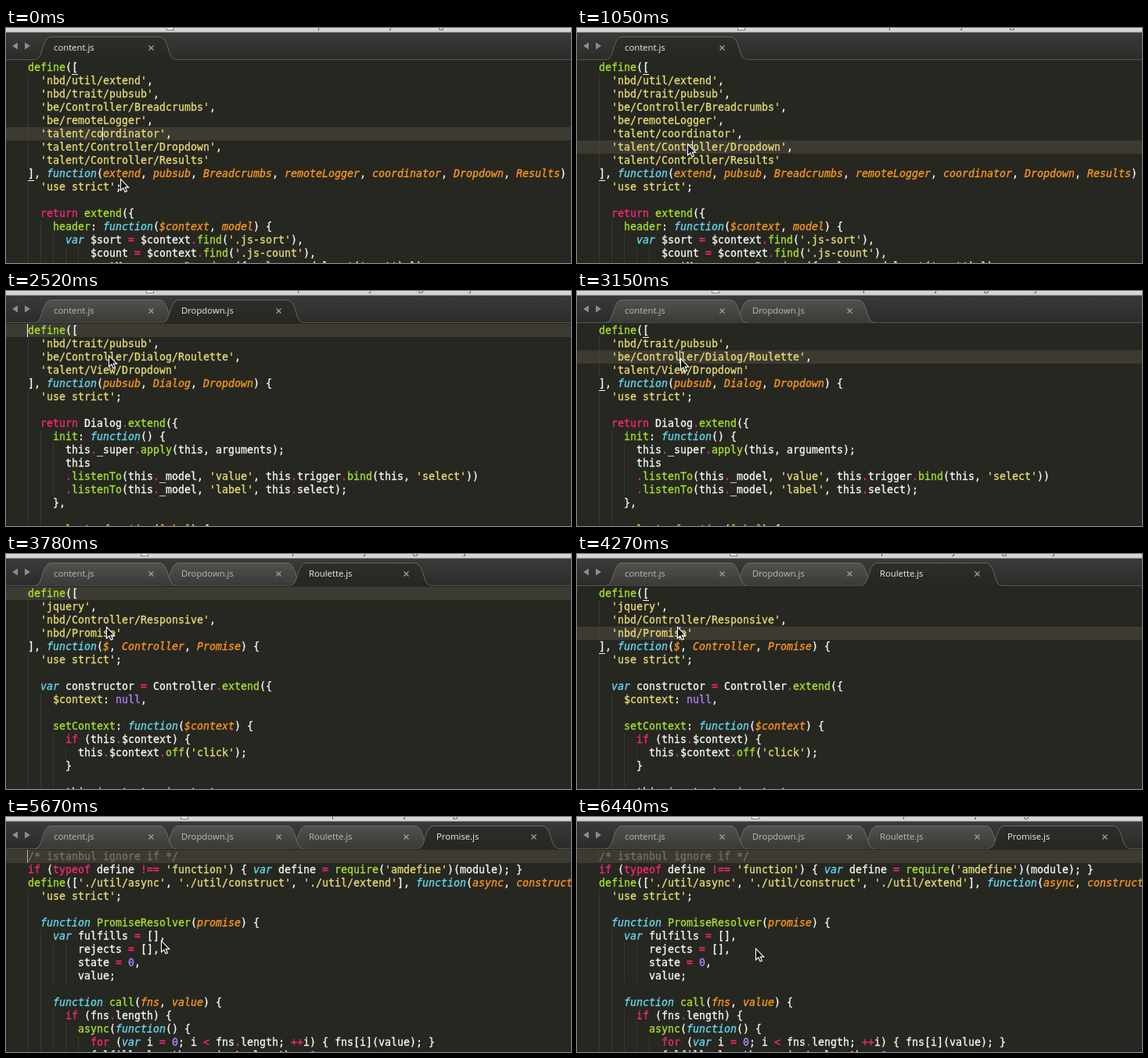
An HTML page with a canvas that plays this animation: 722x301 px, repeating every 6510 ms.

```html
<!DOCTYPE html>
<html lang="en">
<head>
<meta charset="utf-8">
<title>Code editor</title>
<style>
html, body { margin: 0; width: 722px; height: 301px; overflow: hidden; background: #262721; }
canvas { display: block; }
</style>
</head>
<body>
<canvas id="stage" width="722" height="301"></canvas>
<script>
const ctx = document.getElementById('stage').getContext('2d');
const WIDTH = 722, HEIGHT = 301, LOOP = 6510, STEP = 70;
const LEFT = 28, TOP = 42, CELL = 8, LINE = 17;
const MONO = '13.29px "DejaVu Sans Mono", monospace';
const UI = '11.3px "Open Sans", sans-serif';
const INK = {
  back: '#262721', line: '#3d3a32', plain: '#f8f8f2', comment: '#75715e', string: '#e6db74',
  storage: '#66d9ef', keyword: '#f92672', value: '#ae81ff', call: '#a6e22e', param: '#fd971f'
};

const files = {
  content: `define([
  'nbd/util/extend',
  'nbd/trait/pubsub',
  'be/Controller/Breadcrumbs',
  'be/remoteLogger',
  'talent/coordinator',
  'talent/Controller/Dropdown',
  'talent/Controller/Results'
], function(extend, pubsub, Breadcrumbs, remoteLogger, coordinator, Dropdown, Results) {
  'use strict';

  return extend({
    header: function($context, model) {
      var $sort = $context.find('.js-sort'),
          $count = $context.find('.js-count'),
          sortMenu = new Dropdown({ value: model.get('sort') })`,
  dropdown: `define([
  'nbd/trait/pubsub',
  'be/Controller/Dialog/Roulette',
  'talent/View/Dropdown'
], function(pubsub, Dialog, Dropdown) {
  'use strict';

  return Dialog.extend({
    init: function() {
      this._super.apply(this, arguments);
      this
      .listenTo(this._model, 'value', this.trigger.bind(this, 'select'))
      .listenTo(this._model, 'label', this.select);
    },

    select: function(label) {`,
  roulette: `define([
  'jquery',
  'nbd/Controller/Responsive',
  'nbd/Promise'
], function($, Controller, Promise) {
  'use strict';

  var constructor = Controller.extend({
    $context: null,

    setContext: function($context) {
      if (this.$context) {
        this.$context.off('click');
      }

      this.$context = $context;`,
  promise: `/* istanbul ignore if */
if (typeof define !== 'function') { var define = require('amdefine')(module); }
define(['./util/async', './util/construct', './util/extend'], function(async, construct, extend) {
  'use strict';

  function PromiseResolver(promise) {
    var fulfills = [],
        rejects = [],
        state = 0,
        value;

    function call(fns, value) {
      if (fns.length) {
        async(function() {
          for (var i = 0; i < fns.length; ++i) { fns[i](value); }
          fulfills.length = rejects.length = 0;`
};
for (const name in files) files[name] = files[name].split('\n');

const tabs = [
  { name: 'content.js', at: -STEP },
  { name: 'Dropdown.js', at: 1960 },
  { name: 'Roulette.js', at: 3570 },
  { name: 'Promise.js', at: 5040 }
];

// Each entry overrides the fields it names; closer is the row of the matching bracket.
const changes = [
  { at: 0, file: 'content', row: 5, col: 12, closer: 8, active: 0, icon: 210, blink: -350 },
  { at: 770, row: 6, col: 15, blink: null },
  { at: 1610, active: -1, icon: 184 },
  { at: 1680, file: 'dropdown', row: 0, col: 0, closer: 0, blink: 1400 },
  { at: 1960, active: 1 },
  { at: 2590, row: 2, col: 13, closer: 4, blink: null, icon: 204 },
  { at: 3150, active: -1, icon: 177 },
  { at: 3290, file: 'roulette', row: 0, col: 0, closer: 0, blink: 3150 },
  { at: 3570, active: 2 },
  { at: 3990, row: 3, col: 13, closer: 4, blink: null, icon: 200 },
  { at: 4620, active: -1, icon: 184 },
  { at: 4760, file: 'promise', row: 0, col: 0, closer: 0, blink: 4760 },
  { at: 5040, active: 3 },
  { at: 5600, icon: 228 }
];

const pointerPath = [
  [0, 146, 193], [70, 146, 193], [630, 142, 150], [770, 142, 150], [1050, 141, 148],
  [1890, 141, 148], [2520, 131, 82], [2940, 131, 82], [3010, 131, 84], [3080, 131, 84],
  [3150, 132, 86], [3220, 132, 86], [3780, 128, 93], [4550, 128, 93], [4830, 190, 155],
  [5530, 190, 155], [6020, 228, 168], [LOOP, 228, 168]
];

const syntax = new RegExp([
  /(?<comment>\/\*.*?\*\/)/, /(?<string>'[^']*')/, /(?<storage>\b(?:function|var)\b)/,
  /(?<param>(?<=function ?\w*\([^)]*)[$\w]+)/, /(?<keyword>\b(?:if|return|typeof|new|for)\b|[=!<+.]+)/,
  /(?<value>\b(?:null|\d+)\b)/, /(?<call>[$\w]+(?=\(|: function))/, /(?<label>[$\w]+(?=:))/,
  /(?<plain>[$\w]+|[^\s\w])/
].map(r => r.source).join('|'), 'g');

function rect(x, y, w, h, fill) {
  ctx.fillStyle = fill;
  ctx.fillRect(x, y, w, h);
}

function shade(y0, y1, from, to) {
  const g = ctx.createLinearGradient(0, y0, 0, y1);
  g.addColorStop(0, from);
  g.addColorStop(1, to);
  return g;
}

function polygon(points, fill) {
  ctx.beginPath();
  points.forEach(([x, y]) => ctx.lineTo(x, y));
  ctx.closePath();
  ctx.fillStyle = fill;
  ctx.fill();
}

function pointerAt(t) {
  const i = pointerPath.findIndex(p => p[0] > t);
  const [t0, x0, y0] = pointerPath[i - 1], [t1, x1, y1] = pointerPath[i];
  const u = (t - t0) / (t1 - t0), k = u * u * (3 - 2 * u);
  return [Math.round(x0 + (x1 - x0) * k), Math.round(y0 + (y1 - y0) * k)];
}

function caretAlpha(t, reset) {
  if (reset === null) return 1;
  const d = (t - reset) % 1050;
  if (d < 490) return 1;
  if (d < 770) return Math.max(0, 1 - (d - 420) / 280) ** 2;
  return Math.min(1, (d - 770) / 210);
}

function drawLine(text, row) {
  const y = TOP + row * LINE + 13;
  for (const m of text.matchAll(syntax)) {
    const kind = Object.keys(m.groups).find(k => m.groups[k] !== undefined);
    const italic = kind === 'storage' || kind === 'param';
    const x = LEFT + m.index * CELL;
    ctx.font = (italic ? 'italic ' : '') + MONO;
    ctx.fillStyle = ctx.strokeStyle = INK[kind === 'label' ? 'string' : kind];
    ctx.lineWidth = 0.3;
    ctx.fillText(m[0], x, y);
    ctx.strokeText(m[0], x, y);
  }
}

function drawGuides(lines) {
  const indent = s => s ? s.search(/\S/) : 0;
  lines.forEach((s, row) => {
    const depth = s ? indent(s) : Math.min(indent(lines[row - 1]), indent(lines[row + 1]));
    for (let col = 0; col < depth; col += 2)
      for (let y = 0; y < LINE; y++)
        if ((row * LINE + y) % 2) rect(LEFT + col * CELL, TOP + row * LINE + y, 1, 1, '#484941');
  });
}

function drawEditor(t, s) {
  const lines = files[s.file], rowTop = TOP + s.row * LINE;
  rect(0, 41, WIDTH, HEIGHT - 41, INK.back);
  rect(0, rowTop, WIDTH, LINE, INK.line);
  drawGuides(lines);
  lines.forEach(drawLine);
  if (s.closer) {
    rect(LEFT + 7 * CELL, TOP + LINE, CELL, 1, INK.plain);
    rect(LEFT, TOP + s.closer * LINE + LINE, CELL, 1, INK.plain);
  }
  ctx.globalAlpha = caretAlpha(t, s.blink);
  rect(LEFT - 1 + s.col * CELL, rowTop, 1, LINE, INK.plain);
  ctx.globalAlpha = 1;
}

function drawTab(index, active) {
  const x = 37 + index * 163, base = 40.5, top = 11.5;
  ctx.beginPath();
  ctx.moveTo(x, base);
  ctx.bezierCurveTo(x + 11, base, x + 8, top, x + 21, top);
  ctx.lineTo(x + 159, top);
  ctx.bezierCurveTo(x + 172, top, x + 169, base, x + 180, base);
  ctx.fillStyle = active ? shade(11, 41, '#2d2e29', INK.back) : shade(11, 41, '#51524e', '#393a37');
  ctx.fill();
  ctx.strokeStyle = active ? '#666762' : '#6b6c68';
  ctx.lineWidth = 1;
  ctx.stroke();
  if (active) rect(x + 1, 40, 178, 2, INK.back);

  ctx.font = UI;
  ctx.fillStyle = active ? '#eeeeea' : '#b9bab6';
  ctx.fillText(tabs[index].name, x + 24, 29);
  ctx.beginPath();
  for (const d of [-1, 1]) {
    ctx.moveTo(x + 145.5, 25.5 - 3 * d);
    ctx.lineTo(x + 151.5, 25.5 + 3 * d);
  }
  ctx.strokeStyle = '#9b9c98';
  ctx.lineWidth = 1.4;
  ctx.stroke();
}

function drawTabBar(t, s) {
  rect(0, 6, WIDTH, 35, shade(6, 41, '#3a3b38', '#2b2c29'));
  rect(0, 40, WIDTH, 1, '#555651');
  polygon([[15, 18.5], [15, 27.5], [8, 23]], '#8d8e8a');
  polygon([[24, 18.5], [24, 27.5], [31, 23]], '#8d8e8a');
  const shown = tabs.map((_, i) => i).filter(i => t >= tabs[i].at).reverse();
  const order = shown.filter(i => i !== s.active).concat(shown.filter(i => i === s.active));
  for (const i of order) {
    ctx.globalAlpha = t < tabs[i].at + STEP ? 0.5 : 1;
    drawTab(i, i === s.active);
  }
  ctx.globalAlpha = 1;
}

// Only the lowest pixels of the window title are in view.
function drawTitle(icon) {
  rect(0, 0, WIDTH, 6, shade(0, 6, '#dadada', '#cccccc'));
  rect(0, 5, WIDTH, 1, '#8c8c8c');
  rect(icon - 5, 0, 10, 3, '#777777');
  rect(icon - 4, 0, 8, 2, '#ffffff');
  ctx.font = UI;
  ctx.fillStyle = '#444444';
  [['p', 188], ['j', 280], ['g', 343], ['j', 408]].forEach(([c, dx]) => {
    if (icon + dx < 826 - icon) ctx.fillText(c, icon + dx, 0);
  });
}

function drawPointer(x, y) {
  ctx.save();
  ctx.translate(x + 0.5, y + 0.5);
  polygon([[0, 0], [0, 14.5], [3.4, 11.5], [5.6, 16.5], [8, 15.5], [5.8, 10.6], [10.2, 10.6]], '#111111');
  ctx.strokeStyle = '#ffffff';
  ctx.lineWidth = 1.1;
  ctx.stroke();
  ctx.restore();
}

function draw(t) {
  const state = Object.assign({}, ...changes.filter(c => c.at <= t));
  drawEditor(t, state);
  drawTabBar(t, state);
  drawTitle(state.icon);
  drawPointer(...pointerAt(t));
}

const start = performance.now();
let last = -1;
function tick() {
  const t = Math.floor((performance.now() - start) % LOOP / STEP) * STEP;
  if (t !== last) draw(last = t);
  requestAnimationFrame(tick);
}
tick();
</script>
</body>
</html>
```
